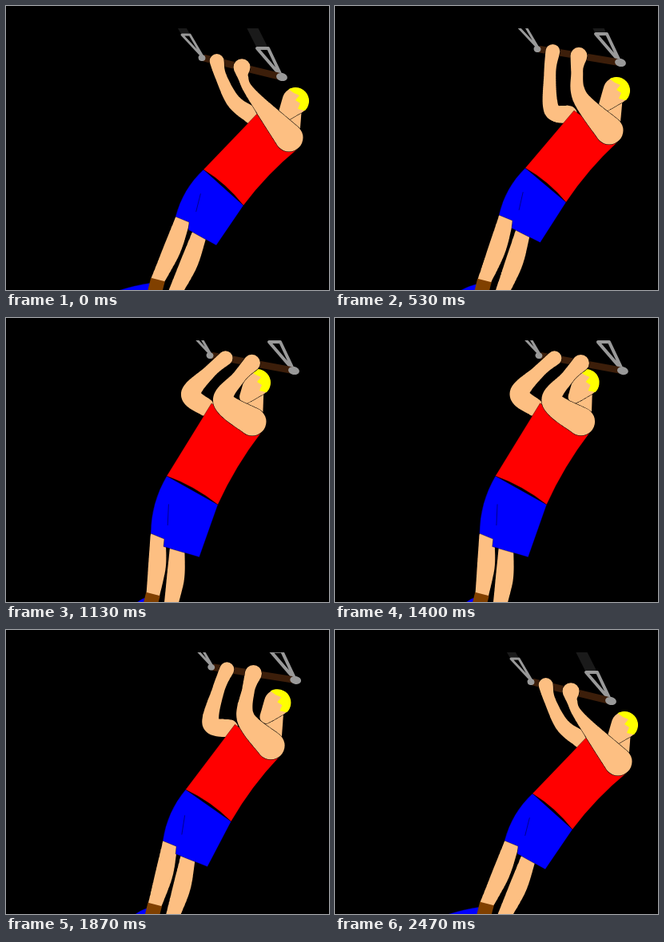
An HTML page with a canvas for the animation above (2540 ms loop, 404 px wide and 356 px high).

```html
<!DOCTYPE html>
<html lang="en">
<head>
<meta charset="utf-8">
<title>Inverted row</title>
<style>
html, body { margin: 0; width: 100%; height: 100%; overflow: hidden; background: #000; }
canvas { display: block; width: 404px; height: 356px; }
</style>
</head>
<body>
<canvas id="stage" width="404" height="356"></canvas>
<script>
const ctx = document.getElementById('stage').getContext('2d');
const LOOP = 2540, STEP = 200 / 3, LAST = 37;
const SKIN = '#fdbf82', RED = '#f00', BLUE = '#00f', YELLOW = '#ff0';
const GREY = '#999', DARK = '#1a1a1a', WOOD = '#3c1e0a', SOCK = '#804000';

// [step, pose]: 0 hanging, 1 and 2 on the way up, 3 chin at the bar
const timing = [[0, 0], [3, 0], [8, 1], [12, 2], [17, 3], [20, 3.2], [25, 2.3], [32, 1], [37, 0], [38, 0]];

// Joint positions in the four poses; elbows add a radius, the ankle a shoe length
const joints = {
  barL: [[247, 65], [255, 54], [260, 44], [257, 47]],
  barR: [[345, 89], [357, 71], [364, 60], [360, 66]],
  farElbow: [[285, 120, 9], [271, 130, 10], [251, 112, 11], [231, 95, 12]],
  nearElbow: [[307, 110, 7], [307, 115, 10], [298, 110, 12], [272, 104, 13]],
  shoulder: [[354, 165], [343, 156], [327, 141], [308, 130]],
  skull: [[362, 119], [352, 106], [335, 86], [314, 81]],
  armpit: [[316, 133], [299, 131], [282, 114], [257, 107]],
  hipL: [[247, 205], [238, 203], [220, 199], [201, 198]],
  hipR: [[297, 250], [289, 246], [279, 238], [265, 234]],
  hem: [[212, 264], [205, 262], [193, 265], [181, 270]],
  ankle: [[190, 343, 51], [187, 344, 31], [186, 344, 24], [184, 346, 21]]
};

const lerp = (a, b, f) => a + (b - a) * f;
const mix = (a, b, f) => a.map((v, i) => lerp(v, b[i], f));
const add = ([x, y], dx, dy) => [x + dx, y + dy];

function poseAt(step) {
  const i = timing.findIndex(([s]) => s > step);
  const [s0, p0] = timing[i - 1], [s1, p1] = timing[i];
  return lerp(p0, p1, (step - s0) / (s1 - s0));
}

function solve(p) {
  const i = Math.min(2, Math.floor(p)), body = {};
  for (const name in joints) body[name] = mix(joints[name][i], joints[name][i + 1], p - i);
  return body;
}

function paint(color) {
  ctx.fillStyle = color;
  ctx.fill();
}

function line(color, width, ...pts) {
  ctx.beginPath();
  pts.forEach(pt => ctx.lineTo(pt[0], pt[1]));
  ctx.strokeStyle = color;
  ctx.lineWidth = width;
  ctx.stroke();
}

// Closed outline of [point, bow]: bow bends the side that follows the point
function panel(color, ...sides) {
  ctx.beginPath();
  ctx.moveTo(...sides[0][0]);
  sides.forEach(([[x, y], bow = 0], i) => {
    const [u, v] = sides[(i + 1) % sides.length][0];
    const k = 2 * bow / Math.hypot(u - x, v - y);
    ctx.quadraticCurveTo((x + u) / 2 + (v - y) * k, (y + v) / 2 - (u - x) * k, u, v);
  });
  paint(color);
  ctx.strokeStyle = 'rgba(0,0,0,.6)';
  ctx.lineWidth = 0.6;
  ctx.stroke();
}

const spline = (a, b, c, d, t) =>
  b + t / 2 * (c - a + t * (2 * a - 5 * b + 4 * c - d + t * (3 * (b - c) + d - a)));

// Soft tube through [x, y, radius] points, with a thin dark rim
function limb(color, ...pts) {
  const at = i => pts[Math.max(0, Math.min(pts.length - 1, i))];
  for (const rim of [0.5, 0]) {
    ctx.beginPath();
    for (let s = 0; s <= pts.length - 1; s += 1 / 32) {
      const i = Math.floor(s);
      const [x, y, r] = [0, 1, 2].map(k => spline(at(i - 1)[k], at(i)[k], at(i + 1)[k], at(i + 2)[k], s - i));
      ctx.moveTo(x, y);
      ctx.arc(x, y, r + rim, 0, 7);
    }
    paint(rim ? '#000' : color);
  }
}

function leg(knee, foot) {
  limb(SKIN, [...knee, 9.5], [...add(mix(knee, foot, 0.5), 2, 0), 11], [...foot, 8.5]);
}

function arm(hand, size, elbow, ...rest) {
  const wrist = add(mix(hand, elbow, 0.38), -3, 0);
  limb(SKIN, [...hand, size], [...wrist, 4 + elbow[2] * 0.35], elbow, ...rest);
}

function handle(end, dx, dy, half, width) {
  const top = add(end, dx, dy);
  line(DARK, width * 3.2, top, add(top, dx * 0.6, dy * 0.8));
  line(GREY, width, end, add(top, -half, 0), add(top, half, 0), end);
}

function knob([x, y], rx, ry) {
  ctx.beginPath();
  ctx.ellipse(x, y, rx, ry, 0.2, 0, 7);
  paint(GREY);
}

function head(skull, shoulder) {
  const [x, y] = skull;
  limb(SKIN, [...mix(skull, shoulder, 0.3), 10], [...shoulder, 13]);
  limb(SKIN, [...skull, 16.5], [...add(skull, -14, 18), 8]);
  ctx.beginPath();
  ctx.arc(x, y, 17, -2.1, 0.8);
  for (const [dx, dy] of [[3, 10], [6, 3], [0, -1], [5, -7], [-2, -10]]) ctx.lineTo(x + dx, y + dy);
  paint(YELLOW);
}

function draw(p) {
  const { barL, barR, farElbow, nearElbow, shoulder, skull, armpit, hipL, hipR, hem, ankle } = solve(p);
  const foot = ankle.slice(0, 2), [ax, ay, shoe] = ankle;
  const nearHem = add(hem, 16, 16.5);
  const nearHemR = add(nearHem, (hipR[0] - hipL[0]) * 0.7, (hipR[1] - hipL[1]) * 0.7 - 12);

  ctx.fillStyle = '#000';
  ctx.fillRect(0, 0, 404, 356);
  ctx.save();
  ctx.beginPath();
  ctx.rect(0, 28, 404, 328);
  ctx.clip();
  ctx.lineJoin = 'round';

  panel(BLUE, [[ax - shoe, 357], 1], [[ax - 8, ay + 4]], [[ax - 8, 358]]);
  leg(add(hem, 9, 4), foot);
  line(SOCK, 18, foot, add(foot, -4, 16));
  leg(mix(nearHem, nearHemR, 0.38), add(foot, 22, 15));
  panel(BLUE, [hipL], [hipR], [nearHemR], [nearHem], [add(hem, 17, 7)], [hem, 5]);
  const fold = t => add(mix(nearHem, hipL, t), 4, 0);
  line('#00005a', 0.7, fold(0.3), fold(0.6));

  handle(barL, -22, -29, 5, 3);
  handle(barR, -24, -36, 7, 4);
  head(skull, shoulder);
  line(WOOD, 8.5, barL, barR);
  knob(add(barL, -2, 0), 4.5, 4);
  knob(barR, 7, 5);

  arm(mix(barL, barR, 0.17), 9, farElbow, [...add(armpit, -7, 5), 11]);
  panel(RED, [armpit], [add(shoulder, 11, 14), -3], [hipR, -3], [hipL]);
  arm(mix(barL, barR, 0.49), 10.5, nearElbow, [...shoulder, 17.5]);
  ctx.restore();
}

let shown = -1;
function tick() {
  const t = Math.floor(performance.now() % LOOP / 10) * 10;
  const step = Math.min(LAST, Math.floor((t + 5) / STEP));
  if (step !== shown) draw(poseAt(shown = step));
  requestAnimationFrame(tick);
}
tick();
</script>
</body>
</html>
```
